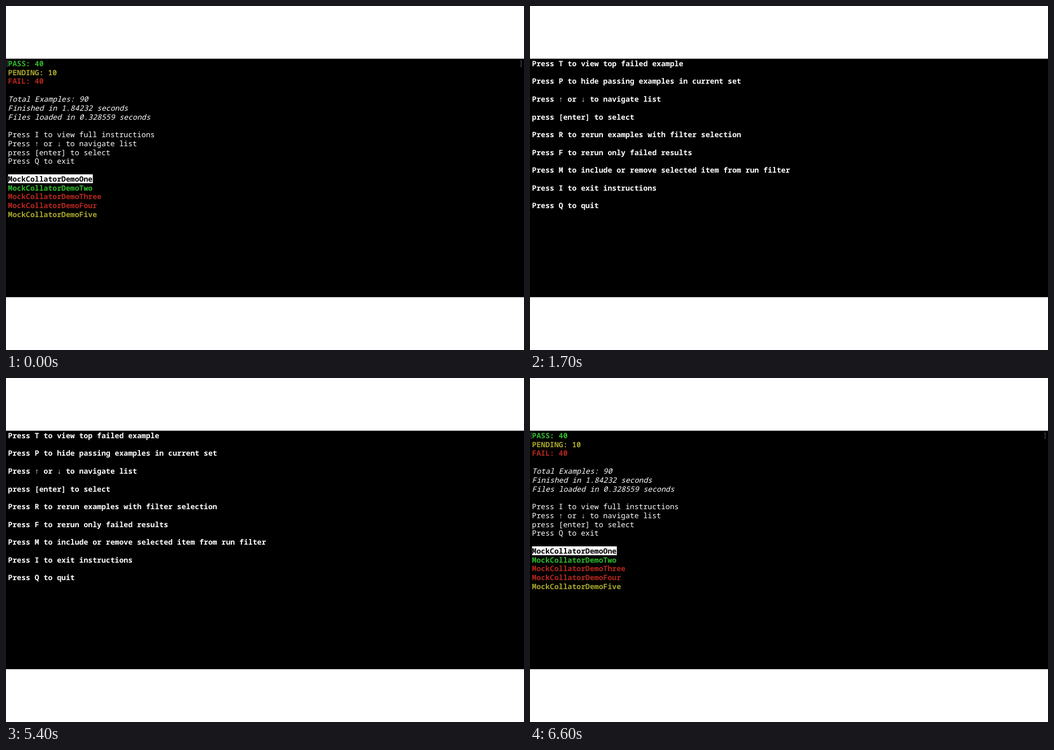
Write an HTML page that moves like this. It is 917 px wide and 611 px high and loops after 6.7 s.

```html
<!DOCTYPE html>
<html lang="en">
<head>
<meta charset="utf-8">
<title>Test runner</title>
<style>
  html, body { margin: 0; width: 100%; height: 100%; overflow: hidden; background: #fff; }
  svg { display: block; width: 100%; height: 100%; }
  text {
    font: 500 13.13px "Noto Sans Mono", "DejaVu Sans Mono", monospace;
    fill: #fff;
    white-space: pre;
    text-rendering: geometricPrecision;
  }
  .bold, .pass, .pending, .fail, .picked { font-weight: 700; }
  .note { font-style: italic; }
  .pass { fill: #32b92d; }
  .pending { fill: #a8a62c; }
  .fail { fill: #b4271e; }
  .picked { fill: #000; }
</style>
</head>
<body>
<svg viewBox="0 0 917 611">
  <rect y="93.6" width="917" height="423.6"/>
  <g id="results">
    <path d="M3.5 97.5H2V107.5H3.5M910.5 97.5H912V107.5H910.5" fill="none" stroke="#777" stroke-width=".8"/>
    <rect x="3.7" y="299" width="150" height="15.7" fill="#fff"/>
  </g>
  <g id="help"></g>
</svg>
<script>
const LOOP = 6700, HELP_START = 900, HELP_END = 5500;
const LEFT = 3.6, BASELINE = 106.9, ROW = 15.77;
const results = document.getElementById("results");
const help = document.getElementById("help");

function addLine(parent, row, style, content) {
  const line = document.createElementNS(parent.namespaceURI, "text");
  line.setAttribute("x", LEFT);
  line.setAttribute("y", BASELINE + row * ROW);
  line.setAttribute("class", style);
  line.textContent = content;
  parent.append(line);
}

[
  [0, "pass", "PASS: 40"],
  [1, "pending", "PENDING: 10"],
  [2, "fail", "FAIL: 40"],
  [4, "note", "Total Examples: 90"],
  [5, "note", "Finished in 1.84232 seconds"],
  [6, "note", "Files loaded in 0.328559 seconds"],
  [8, "plain", "Press I to view full instructions"],
  [9, "plain", "Press ↑ or ↓ to navigate list"],
  [10, "plain", "press [enter] to select"],
  [11, "plain", "Press Q to exit"],
  [13, "picked", "MockCollatorDemoOne"],
  [14, "pass", "MockCollatorDemoTwo"],
  [15, "fail", "MockCollatorDemoThree"],
  [16, "fail", "MockCollatorDemoFour"],
  [17, "pending", "MockCollatorDemoFive"]
].forEach(line => addLine(results, ...line));

[
  "Press T to view top failed example",
  "Press P to hide passing examples in current set",
  "Press ↑ or ↓ to navigate list",
  "press [enter] to select",
  "Press R to rerun examples with filter selection",
  "Press F to rerun only failed results",
  "Press M to include or remove selected item from run filter",
  "Press I to exit instructions",
  "Press Q to quit"
].forEach((content, i) => addLine(help, i * 2, "bold", content));

function draw(now) {
  const t = now % LOOP;
  const helping = t >= HELP_START && t < HELP_END;
  results.style.display = helping ? "none" : "";
  help.style.display = helping ? "" : "none";
}

function tick() {
  draw(performance.now() - start);
  requestAnimationFrame(tick);
}

const start = performance.now();
tick();
</script>
</body>
</html>
```
